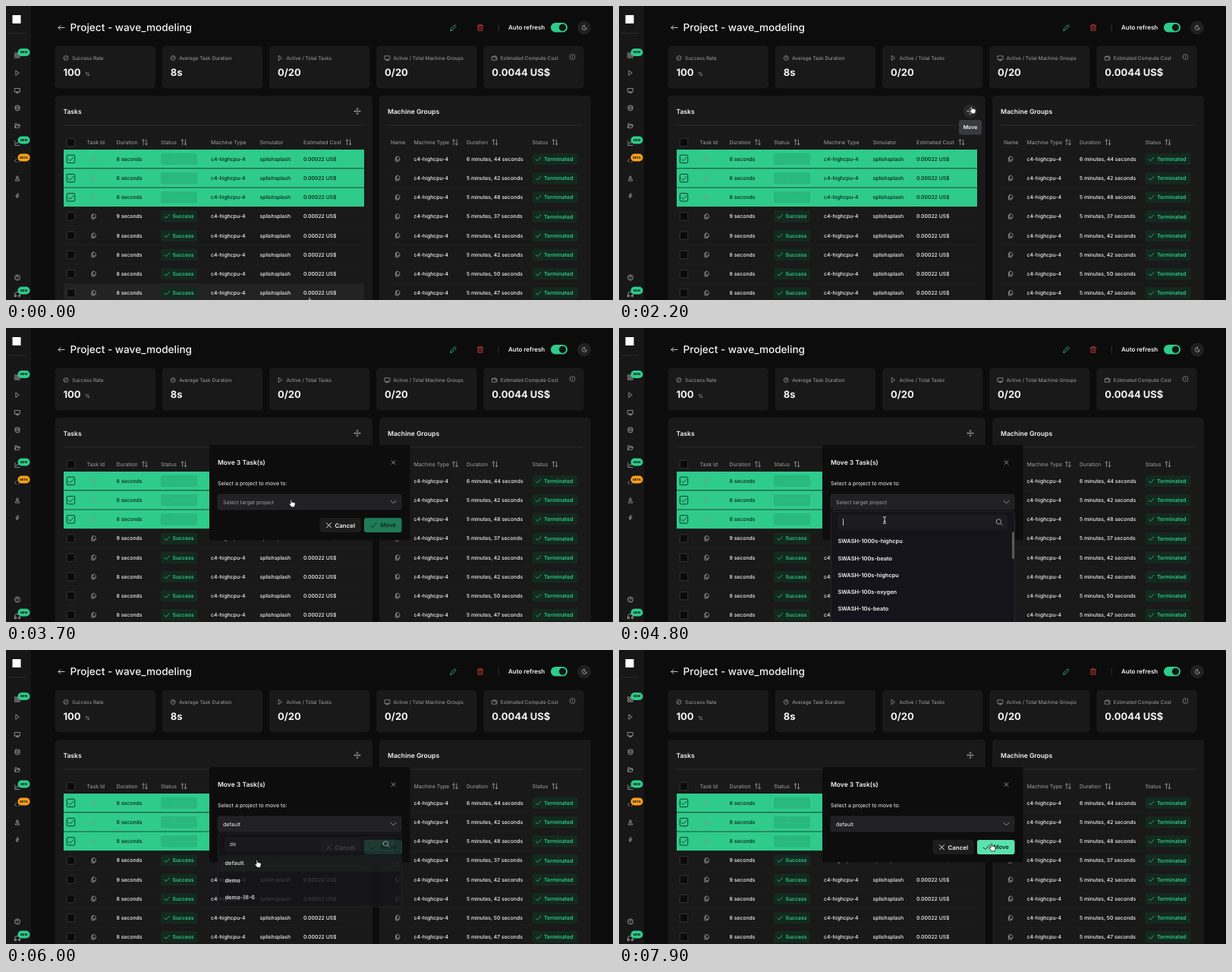
An HTML page for the animation above (8000 ms loop, 800 by 387 pixels).

```html
<!DOCTYPE html>
<html lang="en">
<head>
<meta charset="utf-8">
<title>Move tasks between projects</title>
<style>
html, body { margin: 0; height: 100%; overflow: hidden; background: #0c0c0c; }
svg { display: block; width: 100vw; height: 100vh; font-family: Inter, "Open Sans", sans-serif; }
text { white-space: pre; text-rendering: geometricPrecision; }
.icon { fill: none; stroke-width: .8; stroke-linecap: round; stroke-linejoin: round; }
</style>
</head>
<body>
<svg id="stage" viewBox="0 0 800 387"></svg>
<script>
const GREEN = '#2fcb8b', WHITE = '#f5f5f5', GREY = '#a3a3a3', PANEL = '#191919';

const rect = (x, y, w, h, fill, r = 0, extra = '') =>
  `<rect x="${x}" y="${y}" width="${w}" height="${h}" rx="${r}" fill="${fill}" ${extra}/>`;
// y is the middle of the capital letters
const text = (x, y, str, size = 7, fill = WHITE, weight = 400, extra = '') =>
  `<text x="${x}" y="${(y + size * .364).toFixed(2)}" font-size="${size}" fill="${fill}" font-weight="${weight}" ${extra}>${str}</text>`;
const icon = (x, y, d, color = '#b4b4b4', scale = 1) =>
  `<path class="icon" transform="translate(${x} ${y}) scale(${scale})" d="${d}" stroke="${color}"/>`;
const line = (x1, x2, y, color = '#303030') => rect(x1, y - .4, x2 - x1, .8, color);
const group = (id, body) => `<g id="${id}">${body}</g>`;

const ICONS = {
  grid: 'M-3.5-3.5h2.7v2.7h-2.7zM.8-3.5h2.7v2.7H.8zM-3.5.8h2.7v2.7h-2.7zM.8.8h2.7v2.7H.8z',
  play: 'M-2-3.3 2.5 0-2 3.3z',
  monitor: 'M-3.7-3h7.4v5h-7.4zM0 2v1.5M-2 3.5h4',
  database: 'M-3.2-2.4a3.2 1.3 0 1 0 6.4 0a3.2 1.3 0 1 0-6.4 0v4.8a3.2 1.3 0 0 0 6.4 0v-4.8M-3.2 0a3.2 1.3 0 0 0 6.4 0',
  folder: 'M-3.5 2.8v-5.6h2.4l1 1.2h2.8v1.5M-3.5 2.8l1.4-3.2h6l-1.4 3.2z',
  chart: 'M-3.5-3.3v6.6h7M-1.8 1.2l1.6-2.4 1.4 1.2 2-2.6',
  code: 'M-1.6-2.2-3.8 0l2.2 2.2M1.6-2.2 3.8 0 1.6 2.2',
  user: 'M-1.5-1.6a1.5 1.5 0 1 0 3 0a1.5 1.5 0 1 0-3 0M-3 3.3a3 2.6 0 0 1 6 0z',
  bolt: 'M.6-3.5-2.4.6h2l-.4 2.9L2.4-.6h-2z',
  help: 'M-3.5 0a3.5 3.5 0 1 0 7 0a3.5 3.5 0 1 0-7 0M-1-.9a1 1 0 1 1 1.6.8L0 .6M0 1.9v.1',
  support: 'M-3.5 2.5v-3a3.5 3 0 0 1 7 0v3h-2v-2h2M-3.5.5h2v2h-2',
  clock: 'M-3.3 0a3.3 3.3 0 1 0 6.6 0a3.3 3.3 0 1 0-6.6 0M0-2V0h1.5',
  rate: 'M-3.3 0a3.3 3.3 0 1 0 6.6 0a3.3 3.3 0 1 0-6.6 0M-1.6 1.6l3.2-3.2',
  wallet: 'M-3.4-1.8h6.8v4.8h-6.8zM-3.4-1.8l4.8-1.4v1.4M1.2.4h2.2',
  info: 'M-3.5 0a3.5 3.5 0 1 0 7 0a3.5 3.5 0 1 0-7 0M0-1.7V.4M0 1.7v.1',
  move: 'M-4 0h8M0-4v8M-1.2-2.8 0-4l1.2 1.2M-1.2 2.8 0 4l1.2-1.2M-2.8-1.2-4 0l1.2 1.2M2.8-1.2 4 0 2.8 1.2',
  back: 'M4 0h-8M-1.2-2.8-4 0l2.8 2.8',
  pencil: 'M-3.7 3.7l.7-2.6 4.9-4.9 1.9 1.9-4.9 4.9z',
  trash: 'M-3.7-2.6h7.4M-2.9-2.6v6.4h5.8v-6.4M-1.3-2.6v-1.3h2.6v1.3M-1-.6v2.6M1-.6v2.6',
  moon: 'M.3-3a3 3 0 1 0 3 3.6A2.6 2.6 0 0 1 .3-3z',
  sort: 'M-2 3.5v-7M-3.6-1.9-2-3.5l1.6 1.6M2-3.5v7M.4 1.9 2 3.5l1.6-1.6',
  copy: 'M-1.1-3.4h2.4l1.6 1.6v3.4h-4zM-1.1-1.8h-1.6v5.2H1.3v-1.8',
  check: 'M-3.2.2-1 2.4l4.4-4.6',
  close: 'M-2.5-2.5l5 5M2.5-2.5l-5 5',
  chevron: 'M-3.6-1.8 0 1.8l3.6-3.6',
  search: 'M-3.8-.6a3.2 3.2 0 1 0 6.4 0a3.2 3.2 0 1 0-6.4 0M1.7 1.7l2.4 2.4',
};

const badge = (y, label, color) =>
  rect(15.5, y - 5, 16, 10, color, 5) + text(23.5, y, label, 4, '#0b2419', 800, 'text-anchor="middle"');

function sidebar() {
  const names = ['grid', 'play', 'monitor', 'database', 'folder', 'chart', 'code', 'user', 'bolt'];
  return rect(0, 0, 33, 387, '#171717') + rect(8.5, 12, 11, 11, '#fff') + line(3, 26, 36) +
    names.map((n, i) => icon(15, 65 + i * 23.1, ICONS[n], '#b4b4b4', .9)).join('') +
    icon(15, 357.5, ICONS.help) + icon(15, 380, ICONS.support) +
    badge(61, 'NEW', GREEN) + badge(176.5, 'NEW', GREEN) + badge(199.5, 'BETA', '#ff9f1a') + badge(374.5, 'NEW', GREEN);
}

function header() {
  return icon(73, 28.5, ICONS.back, WHITE) + text(84.5, 28.5, 'Project - wave_modeling', 13.6, WHITE, 500) +
    icon(589.5, 28.5, ICONS.pencil, GREEN) + icon(625, 28.5, ICONS.trash, '#e0403c') +
    rect(648.7, 24, .8, 9, '#3a3a3a') + text(662, 28.3, 'Auto refresh', 8, WHITE, 600) +
    rect(718, 22, 22, 12.6, GREEN, 6.3) + '<circle cx="733.5" cy="28.3" r="4.6" fill="#0d1713"/>' +
    '<circle cx="762" cy="28.5" r="9" fill="#202020"/>' + icon(762, 28.5, ICONS.moon);
}

function cards() {
  const data = [['rate', 'Success Rate', '100'], ['clock', 'Average Task Duration', '8s'],
    ['play', 'Active / Total Tasks', '0/20'], ['monitor', 'Active / Total Machine Groups', '0/20'],
    ['wallet', 'Estimated Compute Cost', '0.0044 US$']];
  return data.map(([name, label, value], i) => {
    const x = 64.5 + i * 141.2;
    return rect(x, 52.5, 132.5, 56, PANEL, 5) + icon(x + 14.5, 68.5, ICONS[name], GREY, .9) +
      text(x + 22.5, 68.7, label, 6.5, GREY) + text(x + 11, 87, value, 13, WHITE, 700);
  }).join('') + text(104, 89, '%', 7, GREY) + icon(746.5, 67, ICONS.info, '#858585');
}

const heads = list => list.map(([x, label, sortX]) =>
  text(x, 179.3, label, 7, GREY) + (sortX ? icon(sortX, 179.3, ICONS.sort, GREY) : '')).join('');
const rowY = i => 201.4 + i * 25.2;
const cell = (x, y, str, ink) => text(x, y, str, 6.85, ink, 500);
const checkbox = (y, on) =>
  rect(80.3, y - 5.2, 10.4, 10.4, on ? GREEN : '#0a0a0a', 1.5, `stroke="${on ? '#0d2a1d' : '#383838'}" stroke-width=".9"`) +
  (on ? icon(85.5, y, ICONS.check, '#0d2a1d') : '');

function tasks() {
  let out = rect(64.5, 118, 418.5, 280, PANEL, 5) + text(75.5, 138.7, 'Tasks', 8.5, WHITE, 600) +
    '<circle id="moveHover" cx="463" cy="138.5" r="9" fill="#292929"/>' + icon(463, 138.5, ICONS.move, GREY) +
    line(75.5, 472, 157) + checkbox(179.5, false) +
    heads([[106.5, 'Task Id'], [145.5, 'Duration', 183], [204, 'Status', 234.5], [270, 'Machine Type'],
      [334.5, 'Simulator'], [392, 'Estimated Cost', 451.5]]) +
    rect(76, 0, 396, 25.2, '#232323', 0, 'id="rowHover"');
  for (let i = 0; i < 8; i++) {
    const y = rowY(i), on = i < 3, ink = on ? '#0b1f16' : WHITE;
    if (on) out += rect(76, y - 12.4, 396, 24.6, GREEN);
    out += line(76, 472, y + 12.6, on ? '#0f2a1e' : '#1e1e1e') + checkbox(y, on) +
      icon(115.5, y, ICONS.copy, on ? '#5fae8b' : GREY, .95) +
      cell(145.5, y, (i === 3 || i === 4 ? 9 : 8) + ' seconds', ink) +
      rect(204, y - 7.7, 48, 15.4, on ? '#29b87d' : '#14291f', 2.5) +
      (on ? text(220, y, 'Success', 6.8, '#2bc083', 600)
        : icon(212, y, ICONS.check, GREEN) + text(219.5, y, 'Success', 6.8, GREEN, 600)) +
      cell(270, y, 'c4-highcpu-4', ink) + cell(334.5, y, 'splishsplash', ink) +
      cell(392, y, '0.00022 US$', ink);
  }
  return out;
}

function machines() {
  const times = ['6 minutes, 44', ...[42, 48, 37, 42, 42, 50, 47].map(s => '5 minutes, ' + s)];
  return rect(492, 118, 279, 280, PANEL, 5) + text(503, 138.7, 'Machine Groups', 8.6, WHITE, 600) +
    line(503, 760, 157) +
    heads([[507, 'Name'], [537.5, 'Machine Type', 592], [607, 'Duration', 644.5], [693.5, 'Status', 723.5]]) +
    times.map((time, i) => {
      const y = rowY(i);
      return line(503, 760, y + 12.6, '#1e1e1e') + icon(516, y, ICONS.copy, GREY, .95) +
        cell(537.5, y, 'c4-highcpu-4') + cell(607, y, time + ' seconds') +
        rect(693.5, y - 7.7, 60, 15.4, '#14291f', 2.5) + icon(701.5, y, ICONS.check, GREEN) +
        text(709, y, 'Terminated', 7, GREEN, 600);
    }).join('');
}

function dialog() {
  return rect(268, 154, 264.5, 125.5, '#0d0d0d', 3) + text(279, 177, 'Move 3 Task(s)', 8.5, WHITE, 600) +
    icon(510.5, 177, ICONS.close) + text(279, 204.5, 'Select a project to move to:', 7.1) +
    rect(279, 219, 242, 20, '#212123', 2.5, 'stroke="#2c2c2c" stroke-width=".6"') +
    text(286, 229.2, '', 7, GREY, 400, 'id="choice"') + icon(510.5, 229, ICONS.chevron) +
    rect(413.5, 250, 54, 19, '#1c1c1c', 3) + icon(425.5, 259.7, ICONS.close, WHITE, 1.2) +
    text(433.5, 259.7, 'Cancel', 7.9, WHITE, 600) + rect(472, 250, 49.5, 19, GREEN, 3, 'id="confirm"') +
    icon(484, 259.7, ICONS.check, '#0b2a1d', 1.2) + text(493.5, 259.7, 'Move', 7.6, '#0b2a1d', 600);
}

function dropdown() {
  const items = (id, names) => group(id, names.map((n, i) => text(288.5, 280.8 + i * 22.2, n, 7.4, WHITE, 600)).join(''));
  return rect(279.3, 241, 242, 160, '#15141a', 2.5, 'id="list" stroke="#303030" stroke-width=".7"') +
    rect(288, 246, 224, 19.5, '#1c1c1f', 2.5) + icon(501, 255.5, ICONS.search) +
    text(294.5, 255.5, '', 7.3, WHITE, 400, 'id="query"') + rect(295, 251, .8, 9, WHITE, 0, 'id="caret"') +
    rect(281, 270, 239, 21.5, '#1b2120', 2, 'id="itemHover"') +
    items('all', ['SWASH-1000s-highcpu', 'SWASH-100s-beato', 'SWASH-100s-highcpu', 'SWASH-100s-oxygen', 'SWASH-10s-beato']) +
    items('matches', ['default', 'demo', 'demo-18-6']) + rect(518, 268, 3, 36, '#5a5a5a', 1.5, 'id="scroll"');
}

const pointers = group('arrow', '<path d="M0-1v9l2.1-2 1.4 3.2 1.4-.6L3.5 5.5h3z" fill="#000" stroke="#fff" stroke-width=".7"/>') +
  group('hand', '<path d="M-2-4.2c0-1.1 1.6-1.1 1.6 0v2.6c.5-.6 1.3-.4 1.5.1.6-.4 1.3-.2 1.5.4.7-.3 1.5.1 1.5.9v1.6c0 1.6-1 2-1 3.4h-4.3c-.4-1.4-1.4-2-2.6-3.7-.5-.8.3-1.6 1-1l.8.7z" fill="#fff" stroke="#000" stroke-width=".7"/>') +
  group('beam', '<path class="icon" d="M-1.8-4.5Q0-4.5 0-3.3V3.3Q0 4.5-1.8 4.5M1.8-4.5Q0-4.5 0-3.3M0 3.3Q0 4.5 1.8 4.5M-1 1.5h2" stroke="#fff"/>');

document.getElementById('stage').innerHTML = rect(0, 0, 800, 387, '#0c0c0c') + sidebar() + header() + cards() +
  tasks() + machines() +
  group('tooltip', rect(448, 150, 30, 19.5, '#393a3f', 3) + text(463, 159.8, 'Move', 7, WHITE, 600, 'text-anchor="middle"')) +
  group('dialog', dialog()) + group('dropdown', dropdown()) + group('pointer', pointers);

const el = id => document.getElementById(id);
const show = (id, on) => { el(id).style.display = on ? '' : 'none'; };
const clamp = v => Math.max(0, Math.min(1, v));

// Each leg: start, end, target x, target y, sideways bow
const LEGS = [[700, 1700, 466, 137, 11], [2700, 3500, 377, 231, 0], [4100, 4700, 350, 253, 0],
  [5300, 5800, 332, 281.5, 0], [6300, 7300, 492, 260, 0]];

function pointerAt(t) {
  let x = 401, y = 388;
  for (const [start, end, toX, toY, bow] of LEGS) {
    const p = clamp((t - start) / (end - start)), e = p * p * (3 - 2 * p);
    x += (toX - x) * e + bow * 4 * e * (1 - e);
    y += (toY - y) * e;
  }
  return [x, y];
}

function draw(t) {
  const [x, y] = pointerAt(t);
  const inBox = (left, top, right, bottom) => x > left && x < right && y > top && y < bottom;
  const modal = t >= 2500, chosen = t >= 5900, typed = t >= 5200 ? 'de' : t >= 5000 ? 'd' : '';
  const open = t >= 4000 && t < 6120;
  const row = Math.floor((y - 188.8) / 25.2);
  const onRow = !modal && row >= 0, onMove = !modal && inBox(454, 129, 473, 148);
  const onConfirm = chosen && inBox(472, 250, 522, 269);
  const onSearch = open && inBox(288, 246, 512, 265.5);
  const onItem = open && typed && inBox(281, 269, 520, 292);

  show('rowHover', onRow);
  el('rowHover').setAttribute('y', rowY(Math.min(row, 7)) - 12.6);
  show('moveHover', onMove);
  show('tooltip', onMove && t >= 1700);

  el('dialog').style.opacity = clamp((t - 2400) / 200);
  show('dialog', modal);
  el('choice').textContent = chosen ? 'default' : 'Select target project';
  el('choice').setAttribute('fill', chosen ? WHITE : GREY);
  el('confirm').setAttribute('fill', onConfirm ? '#5ce2ac' : chosen ? GREEN : '#1f7a56');

  show('dropdown', open);
  el('dropdown').style.opacity = 1 - clamp((t - 5975) / 145);
  el('list').setAttribute('height', typed ? 97 : 160);
  el('query').textContent = typed;
  show('caret', !typed);
  show('all', !typed);
  show('scroll', !typed);
  show('matches', typed);
  show('itemHover', onItem);

  const onField = modal && inBox(279, 219, 521, 239);
  const hand = onRow || onMove || onField || onConfirm || onItem;
  show('beam', onSearch);
  show('hand', !onSearch && hand);
  show('arrow', !onSearch && !hand);
  el('pointer').setAttribute('transform', `translate(${x.toFixed(2)} ${y.toFixed(2)})`);
}

function tick() {
  draw(Math.floor(performance.now() % 8000 / 100) * 100);
  requestAnimationFrame(tick);
}
tick();
</script>
</body>
</html>
```
